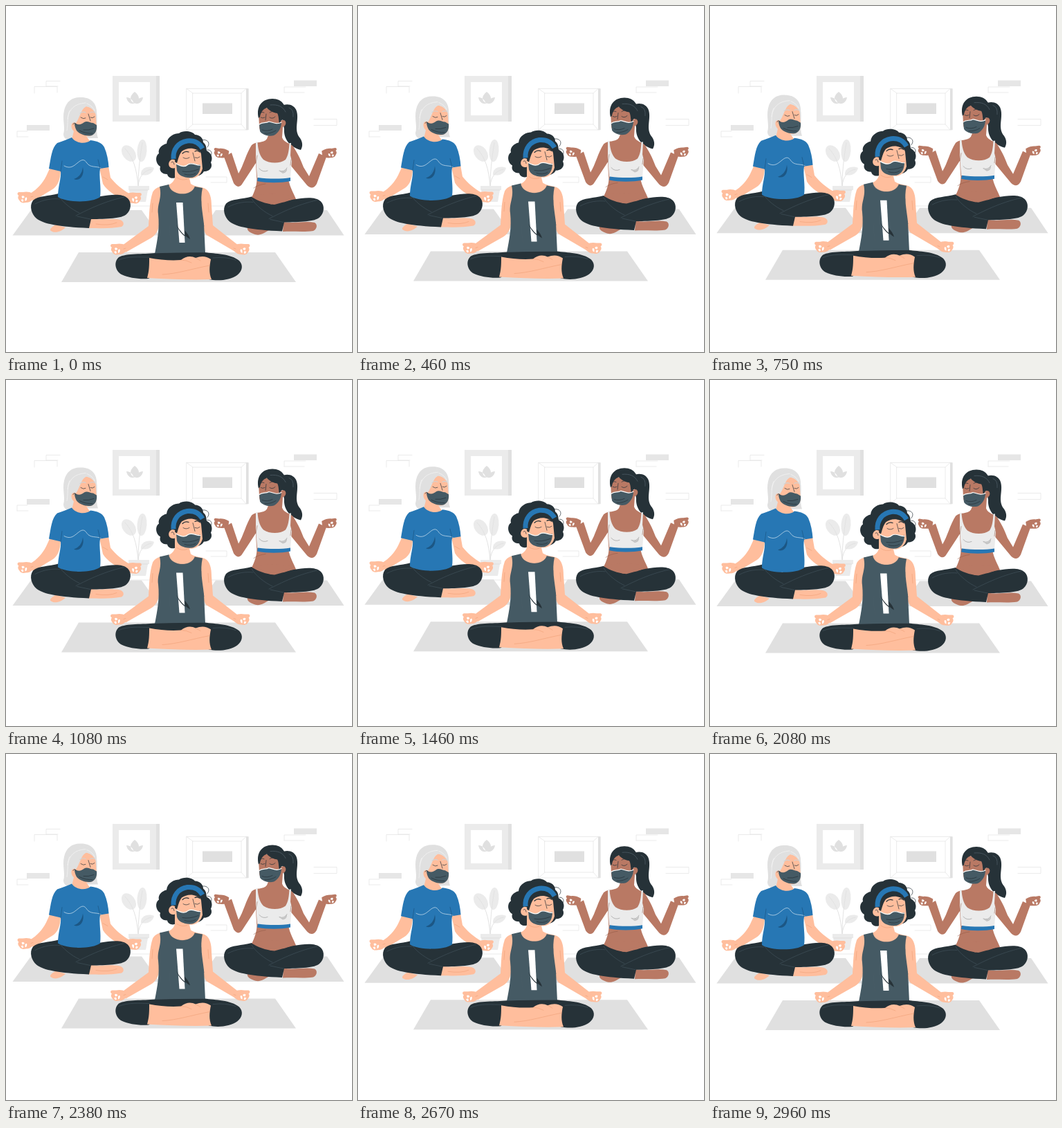
An HTML page for the animation above (3000 ms loop, 500x500 px).

```html
<!DOCTYPE html>
<html lang="en">
<head>
<meta charset="utf-8">
<title>Meditation class</title>
<style>
  html, body { margin: 0; width: 100%; height: 100%; overflow: hidden; background: #fff; }
  svg { display: block; width: 100vw; height: 100vh; }
  .line { fill: none; stroke-linecap: round; stroke-linejoin: round; }
  .pale { stroke: #e3e3e3; }
  .ink { stroke: #263238; }
  .seam { stroke: #4b5d67; stroke-width: .5; }
  .skin { fill: #ffbe9d; }
  .fold { stroke: #eb996e; stroke-width: .5; }
  .brown { fill: #b97964; }
  .brownFold { stroke: #91543f; stroke-width: .5; }
  .dark { fill: #263238; }
  .slate { fill: #455a64; }
  .blue { fill: #2777b4; }
  .mat { fill: #e0e0e0; }
  .soft { fill: #ebebeb; }
</style>
</head>
<body>
<svg viewBox="0 0 500 500" stroke-width=".7">
  <defs>
    <g id="hand">
      <path d="M23 3C17 0 12 0 8 1L2 1C-1 2 0 5 2 6C0 8 1 11 3 13C4 16 8 17 12 16C17 16 20 14 23 11Z"/>
      <path fill="#fff" d="M6 7C8 5 11 7 10 9L7 10ZM11 10C13 7 15 9 13 13L11 14ZM5 12L8 11L9 14L7 15Z"/>
    </g>
    <g id="crossedLegs">
      <path class="dark" d="M76 271C62 275 46 274 39 281C33 289 37 301 44 307C54 315 76 319 120 321L123 308C145 308 168 307 174 301C181 295 182 284 176 278C168 270 150 273 137 275L104 282Z"/>
      <path class="line seam" d="M76 274C82 284 95 294 106 299M101 303C113 297 139 283 171 276M103 304L122 308M42 286C55 279 68 278 78 279"/>
    </g>
  </defs>

  <g id="room">
    <path class="line pale" d="M58 116V108.500H78M58 116H75M41 126V116.500H74V125M16 189V181H31M16 189H32M402 125V117H433M402 125H431M445 163.500H478V172.500H445M289 247H319V255H296M180 289H322"/>
    <path fill="#e6e6e6" d="M30 172H63V180H30ZM416 107.500H449V116H416Z"/>
    <path class="soft" d="M154 101H218V167H154Z"/>
    <path class="mat" d="M217 101H222V167H217Z"/>
    <path fill="#fff" d="M163 110H208V158H163Z"/>
    <path class="mat" d="M186 124C178 130 178 137 186 141C194 137 194 130 186 124ZM174 132C180 132 183 136 185 141C179 142 175 138 174 132ZM198 132C192 132 189 136 187 141C193 142 197 138 198 132Z"/>
    <path class="mat" d="M347 119.500H350.500V179H347Z"/>
    <path class="line pale" d="M261 119.500H350V179H261ZM270 126H340V171H270ZM261 119.500L270 126M347 119.500L340 126M261 179L270 171M347 179L340 171"/>
    <path class="mat" d="M284 140.500H327V156H284Z"/>
    <g class="soft">
      <ellipse cx="177.500" cy="213" rx="9" ry="13" transform="rotate(-36 177.500 213)"/>
      <ellipse cx="196.500" cy="209" rx="7" ry="16" transform="rotate(4 196.500 209)"/>
      <path d="M195 244C194 235 204 230 214 234C212 243 203 246 195 244Z"/>
    </g>
    <path class="line pale" stroke-width="1" d="M172 206C184 219 189 235 191 261M197 198C193 222 191 242 191 261M210 236C198 238 192 248 191 260"/>
    <path class="soft" d="M177 260H207V266H205L202 283H181L178 266H177Z"/>
    <path class="line" stroke="#d8d8d8" d="M179 266H205"/>
  </g>

  <g id="people">
    <path class="mat" d="M36 295H196L222 331.500H9.500ZM303 295H464L488.500 331.500H278Z"/>

    <g id="elder">
      <path class="mat" d="M95 193C90 195 83 192 83 185C86 175 81 164 84 151C87 137 97 131 109 132C123 132 131 141 131 153C133 165 129 180 133 191L122 191L106 190Z"/>
      <path class="skin" d="M101 169C106 163 108 150 115 145C122 146 128 149 129.500 155L131 177C129 186 123 189 116 188L121 195C119 203 102 203 95 193L98 181C92 175 94 166 101 169Z"/>
      <path class="mat" d="M98 168C104 161 105 151 116 145C122 146 127 150 130 157L131 154C131 143 121 135 109 135C96 139 91 157 94 168Z"/>
      <path class="line" stroke="#f5f5f5" d="M89 163C91 149 99 141 115 140M88 180C90 170 88 159 92 151M117 141Q126 145 128 151"/>
      <path class="slate" d="M99 169C105 173 109 171 113 168C118 165 121 169 126 169L131 172C132 179 129 185 124 187C116 189 106 185 102 180C100 176 99 173 99 169Z"/>
      <path class="line ink" d="M108 161Q112 164 115 162M122 161Q125 163 128 160M119 156L122 166M97 171Q98 167 102 171M112 179Q119 180 127 177M106 180Q116 185 125 184"/>
      <path class="line" stroke="#d2d2d2" stroke-width="1.200" d="M107 155Q111 152 115 154M122 154Q125 152 128 154"/>
      <path class="skin" d="M64 233L79 239C78 252 74 261 67 265L39 282L35 271C45 265 53 256 58 246ZM135 234L148 231L151 248C158 257 168 265 178 271L174 282C160 276 146 267 140 257Z"/>
      <use href="#hand" class="skin" x="16.500" y="268"/>
      <use href="#hand" class="skin" transform="translate(196 269) scale(-1 1)"/>
      <path class="skin" d="M72 316L86 320C80 326 71 329 65 325C62 323 66 319 72 316ZM122 307C135 310 149 306 165 309C171 311 171 317 167 319C151 322 137 321 119 321Z"/>
      <use href="#crossedLegs"/>
      <path class="blue" d="M95 190C101 199 116 200 122 194C132 195 139 198 142 204C146 213 148 224 148.500 233L136 235C134 246 138 262 136 276C124 285 87 284 75 276C75 261 80 249 79 239L62 235C65 219 66 205 74 198C82 195 89 193 95 190Z"/>
      <path fill="#1c5785" d="M111 233C110 242 105 248 98 250C107 254 114 244 111 233Z"/>
      <path class="line" stroke="#d5e5f1" d="M84 231C93 236 98 231 103 227C110 221 113 221 117 227C122 234 130 231 137 234"/>
      <path class="line" stroke="#1c5785" d="M79 239L81 224M136 235L133 222"/>
      <path class="line fold" d="M140 247L147 251M36 276L39 275M130 315Q149 318 160 313"/>
    </g>

    <g id="athlete">
      <path class="dark" d="M397 145C405 140 417 142 420 152C424 165 415 179 425 191C429 197 429 203 426 208C411 204 401 193 402 178Z"/>
      <path class="brown" d="M371 147L393 148L397 166C404 161 408 171 400 175L399 190C402 198 411 198 415 203C423 215 427 225 430 233L438 246L452 213L463 218L449 257C445 264 440 264 435 259L411 230L408 250C410 262 416 271 419 279C407 294 367 294 354 279C359 269 364 256 362 246L361 227L342 256C338 263 333 262 329 256L315 218L326 212L336 242C343 231 347 213 355 201C361 195 372 199 377 192L379 187C370 186 366 180 366 174L365 155Z"/>
      <path class="dark" d="M365 162C361 145 370 134 385 134C400 134 407 146 404 161L401 164C396 165 397 168 395 171C394 164 394 158 392 155C386 154 380 151 377 147C371 149 368 154 367 160Z"/>
      <path class="line" stroke="#52616a" d="M382 143C393 142 400 145 404 153M409 147Q416 149 415 160"/>
      <path class="slate" d="M366 171C371 167 375 170 380 167C386 168 391 172 398 168C398 177 393 184 387 187C379 189 370 186 367 181Z"/>
      <path class="line" stroke="#fff" stroke-width="1.200" d="M366 171C371 167 375 170 380 167C386 168 391 172 398 168"/>
      <path class="line ink" d="M368 161Q371 163 374 161M381 161Q385 164 389 160M376 156L375 165M367 155Q370 152 373 154M381 154Q385 151 390 154M370 179Q377 182 385 178M374 184Q382 185 390 180"/>
      <use href="#hand" class="brown" transform="translate(301 204) rotate(8) scale(.95 .86)"/>
      <use href="#hand" class="brown" transform="translate(477.500 204) rotate(-8) scale(-.95 .86)"/>
      <path class="soft" fill="#e0e0e0" d="M361 197L363.500 196C364 206 366 216 372 222C381 228 396 228 404 222C408 216 409 207 409.500 198L412 198L411 216L413 224L411 249C397 252 377 252 363 248L361 222Z"/>
      <path class="blue" d="M364 248C380 250 398 250 411 248V253C397 256 377 256 363 253Z"/>
      <path class="line" stroke="#9b9b9b" d="M366 235Q371 241 378 238M395 238Q402 241 406 234"/>
      <path fill="#c4c4c4" d="M394 238Q404 242 406 233Q407 241 400 242Z"/>
      <path class="line brownFold" d="M361 227L363 216M411 230L412 222M385 272L386 275M358 263Q365 258 375 257"/>
      <path class="brown" d="M352 317L380 324C371 329 366 333 357 329C349 326 346 321 352 317ZM401 312C417 315 432 310 446 313C451 316 449 323 444 325C430 327 415 325 400 326Z"/>
      <g transform="translate(279 4.500)"><use href="#crossedLegs"/></g>
      <path class="brown" d="M355 276C366 270 407 270 418 277C407 283 398 284 388 287C375 286 363 281 355 276Z"/>
    </g>

    <g id="leader">
      <path class="mat" d="M105 356H389L419 399H80Z"/>
      <path class="dark" d="M232 199C233 188 244 184 250 184C257 179 269 181 273 186C280 186 285 191 285 197C290 201 289 205 290 209C298 213 299 221 296 226C300 234 292 240 286 239C282 246 274 247 268 244L247 246C243 251 234 249 233 243C225 243 221 238 223 232C216 228 215 217 221 213C219 206 226 200 232 199Z"/>
      <path class="line ink" d="M279 195C289 190 297 197 291 204M291 208C297 207 299 214 295 217"/>
      <path class="skin" d="M223 261C232 260 242 258 244 248L244 234C235 237 232 226 239 222C242 221 245 222 246 225C249 216 252 205 264 202C274 202 280 206 282 214L284 235C281 246 273 250 265 249L267 257C274 262 282 261 288 264C295 268 297 278 297 289L299 317L336 346L331 355L290 331C280 320 284 290 281 279L225 279L221 317C220 325 216 331 210 335L173 356L168 346L206 318C207 302 207 284 212 269C215 264 219 262 223 261Z"/>
      <path class="dark" d="M244 225C245 211 252 202 266 199C276 200 281 205 283 213C273 203 261 205 254 210C250 215 249 221 247 227Z"/>
      <path fill="none" stroke="#2777b4" stroke-width="7" d="M242 221C241 207 249 197 262 195C273 194 280 199 284 206"/>
      <path class="slate" d="M246 228C253 232 259 233 263 229C269 225 275 231 281 229C281 239 277 246 269 248C258 249 249 245 247 238Z"/>
      <path class="line" stroke="#fff" stroke-width="1.200" d="M246 228C253 232 259 233 263 229C269 225 275 231 281 230"/>
      <path class="line ink" d="M256 219Q260 222 265 219M273 219Q277 221 280 218M270 212L273 224M239 226Q242 223 243 229M255 239Q265 241 278 236M258 243Q267 246 274 242"/>
      <path class="line ink" stroke-width="1.300" d="M255 213Q259 209 264 211M273 210Q277 208 280 211"/>
      <use href="#hand" class="skin" x="151" y="343"/>
      <use href="#hand" class="skin" transform="translate(352.500 343) scale(-1 1)"/>
      <path class="slate" d="M222 261L235 258C237 274 267 277 273 261L284 263C280 281 284 296 286 315L288 358H215C219 337 222 322 220 301C218 285 226 279 222 261Z"/>
      <path fill="#fff" d="M246 284H255.500L258.500 342H250.500Z"/>
      <path class="dark" d="M246 316C252 326 258 332 266 337C265 333 262 328 258 324L259 333C253 329 249 323 246 316Z"/>
      <path class="line seam" d="M235 258C237 275 268 277 273 261M239 343Q235 327 237 317M286 318Q280 300 282 282"/>
      <path class="dark" d="M216 357C198 359 174 357 163 363C155 370 158 383 167 388C178 393 192 395 206 394L222 383L285 377L293 395C307 398 324 396 334 389C342 383 343 374 337 368C325 358 302 358 287 356Z"/>
      <path class="skin" d="M207 364C222 367 239 368 253 367C260 361 268 361 274 364C282 361 289 361 296 366C294 376 293 386 297 395C270 396 239 395 204 393C207 382 207 375 207 364Z"/>
      <path class="line fold" d="M226 388C247 387 268 380 294 375M253 367Q261 367 268 371M274 364L281 368"/>
      <path class="line seam" d="M216 357Q251 354 287 356M163 367C177 361 193 363 207 363M299 364Q318 362 332 367"/>
      <path class="line fold" d="M212 285L211 298M292 285L293 298M170 351L173 350M332 351L329 350M247 248Q254 253 262 250"/>
    </g>
  </g>
</svg>
<script>
  const LOOP = 3000, LIFT = 6.7;
  const people = document.getElementById('people');

  function draw(now) {
    const phase = (now % LOOP) / LOOP;
    const rise = LIFT * (1 - Math.cos(phase * 2 * Math.PI)) / 2;
    people.setAttribute('transform', `translate(0 ${-rise})`);
    requestAnimationFrame(draw);
  }
  draw(0);
</script>
</body>
</html>
```
